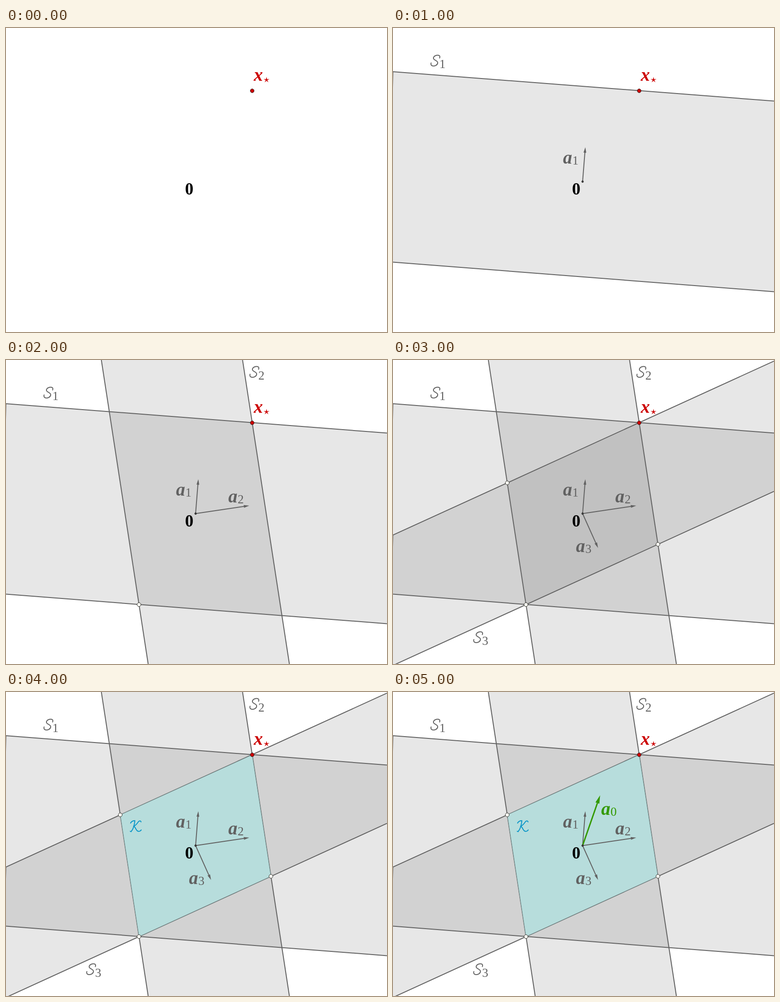
These frames come from a looping animation (838x668 px, 6 s). An HTML page:

```html
<!DOCTYPE html>
<html lang="en">
<head>
<meta charset="utf-8">
<title>Intersection of slabs</title>
<style>
  html, body { margin: 0; width: 100%; height: 100%; overflow: hidden; background: #fff; }
  svg { display: block; width: 838px; height: 668px; }
  text { font-family: "Liberation Serif", serif; }
  .vec { font: italic bold 40px "Liberation Serif", serif; }
  .sub { font-size: 27px; }
</style>
</head>
<body>
<svg id="stage" viewBox="0 0 838 668"></svg>
<script>
const LOOP = 6000;
const GREY = '#616161', RED = '#cc0000', GREEN = '#339900', BLUE = '#0a96c8';
const ORIGIN = [417, 337.5];
const APEX = [541.5, 138];
const LEFT = [251.3, 270], RIGHT = [582.7, 405], BOTTOM = [292.5, 537.5];

// No installed font carries these calligraphic capitals.
const SCRIPT = {
  S: 'M20.5 7.5C22.5 2.5 19 .8 15 1.2C9 1.8 5 6.5 8 10.2C10.5 13 17 13.5 16.3 18.5C15.6 23 10 25.5 6 25C2.5 24.6 .6 22 1.8 18.2',
  K: 'M2 6.5C4 2.5 8 1.2 11.5 1.2C10.5 11 8 20 3 25.5L1.2 24.5M25 4C24 .5 20.5 1.5 18.5 4.5C15.5 9 12.5 12.5 8.5 13.5C13 13.5 13.5 24.5 19.5 24.8C22.5 24.8 24.5 23 25.5 21.5'
};

const stage = document.getElementById('stage');

function add(parent, tag, attrs, text) {
  const el = document.createElementNS('http://www.w3.org/2000/svg', tag);
  for (const key in attrs) el.setAttribute(key, attrs[key]);
  if (text) el.textContent = text;
  parent.appendChild(el);
  return el;
}

// A group that pops in at `start` and stays until the loop ends.
function layer(start) {
  const g = add(stage, 'g', {});
  if (start > 0) {
    g.animate([
      { opacity: 0, offset: 0, easing: 'steps(1, end)' },
      { opacity: 1, offset: start / LOOP },
      { opacity: 1, offset: 1 }
    ], { duration: LOOP, iterations: Infinity });
  }
  return g;
}

function line(g, a, b, color = GREY, width = 2) {
  add(g, 'line', { x1: a[0], y1: a[1], x2: b[0], y2: b[1], stroke: color, 'stroke-width': width });
}

function dot(g, [cx, cy], r, fill, stroke = '#222') {
  add(g, 'circle', { cx, cy, r, fill, stroke, 'stroke-width': 1 });
}

function arrow(g, tip, color = GREY, width = 2, head = 12) {
  const dx = tip[0] - ORIGIN[0], dy = tip[1] - ORIGIN[1], len = Math.hypot(dx, dy);
  const ux = dx / len, uy = dy / len, half = head / 4;
  const base = [tip[0] - ux * head, tip[1] - uy * head];
  line(g, ORIGIN, base, color, width);
  const corners = [tip,
    [base[0] - uy * half, base[1] + ux * half],
    [base[0] + uy * half, base[1] - ux * half]];
  add(g, 'polygon', { points: corners.join(' '), fill: color });
}

function vectorLabel(g, x, y, index, color = GREY) {
  add(g, 'text', { x, y, class: 'vec', fill: color }, 'a');
  add(g, 'text', { x: x + 20.5, y: y + 2, class: 'sub', fill: color }, index);
}

function script(g, letter, x, y, color) {
  add(g, 'path', {
    d: SCRIPT[letter], transform: `translate(${x} ${y})`, role: 'img', 'aria-label': letter,
    fill: 'none', stroke: color, 'stroke-width': 2, 'stroke-linecap': 'round', 'stroke-linejoin': 'round'
  });
}

function star(g, cx, cy, outer, inner) {
  const points = Array.from({ length: 10 }, (_, i) => {
    const r = i % 2 ? inner : outer, angle = i * Math.PI / 5 - Math.PI / 2;
    return [cx + r * Math.cos(angle), cy + r * Math.sin(angle)];
  });
  add(g, 'polygon', { points: points.join(' '), fill: RED });
}

// Each slab: two border lines, its normal vector and both labels.
const slabs = [
  { start: 1000, lines: [[[0, 96], [838, 160.5]], [[0, 514.5], [838, 579.5]]],
    edge: [[.4, 96], [-.8, 143]], tip: [423, 262], vec: [374, 298], name: [82, 58.5] },
  { start: 2000, lines: [[[209.7, 0], [312.7, 668]], [[520.3, 0], [623.3, 668]]],
    tip: [535, 320], vec: [489, 313], name: [535, 13] },
  { start: 3000, lines: [[[0, 384.7], [838, 2.3]], [[0, 671], [838, 288.7]]],
    edge: [[.3, 385], [-.8, 420]], tip: [451, 413], vec: [402.5, 422], name: [176, 596] }
];

for (const { start, lines: [top, low] } of slabs) {
  add(layer(start), 'polygon', {
    points: [top[0], top[1], low[1], low[0]].join(' '), fill: '#646464', 'fill-opacity': .155
  });
}

for (const { start, lines, edge } of slabs) {
  const g = layer(start);
  lines.forEach(([a, b]) => line(g, a, b));
  if (edge) line(g, ...edge, GREY, 1);
}

const body = layer(4000);
add(body, 'polygon', {
  points: [APEX, RIGHT, BOTTOM, LEFT].join(' '),
  fill: '#b7dddc', stroke: '#759090', 'stroke-width': 1
});
script(body, 'K', 272, 281.5, BLUE);

slabs.forEach(({ start, tip, vec, name }, i) => {
  const g = layer(start);
  arrow(g, tip);
  vectorLabel(g, ...vec, i + 1);
  script(g, 'S', ...name, GREY);
  add(g, 'text', { x: name[0] + 20, y: name[1] + 29.5, class: 'sub', fill: GREY }, i + 1);
});

const objective = layer(5000);
arrow(objective, [455.5, 227], GREEN, 3, 18);
vectorLabel(objective, 458, 270, '0', GREEN);

dot(layer(1000), ORIGIN, 2, '#444');
dot(layer(2000), BOTTOM, 4.2, '#fffff4');
const corners = layer(3000);
dot(corners, LEFT, 4.2, '#fffff4');
dot(corners, RIGHT, 4.2, '#fffff4');

const base = layer(0);
add(base, 'text', { x: 393.8, y: 365.5, 'font-size': 37, 'font-weight': 'bold' }, '0');
add(base, 'text', { x: 545, y: 116, class: 'vec', fill: RED }, 'x');
star(base, 573, 114, 6.8, 2);
dot(base, APEX, 4.2, RED);
</script>
</body>
</html>
```
